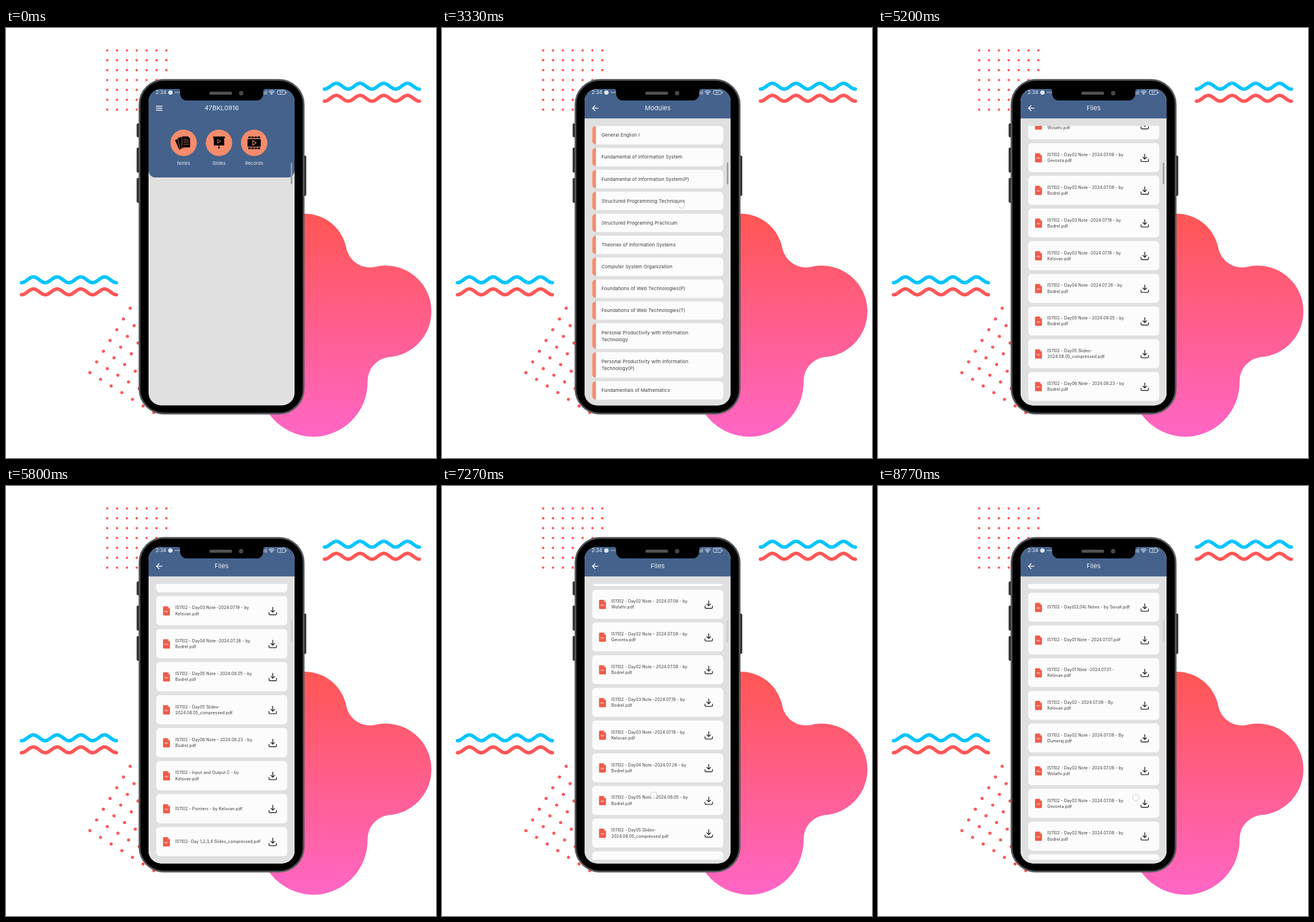
An HTML page that plays this animation: 748 px wide and 748 px high, repeating every 8810 ms.

```html
<!DOCTYPE html>
<html lang="en">
<head>
<meta charset="utf-8">
<title>Course notes app</title>
<style>
  html, body { margin: 0; width: 100%; height: 100%; overflow: hidden; background: #fff; }
  svg { display: block; width: 100vw; height: 100vh; }
  text { font-family: Inter, "Open Sans", sans-serif; }
  .title { font-size: 11px; letter-spacing: .05px; fill: #f3f5f8; text-anchor: middle; }
  .label { font-size: 7.9px; letter-spacing: .12px; fill: #eef1f5; text-anchor: middle; }
  .module { font-size: 8.2px; letter-spacing: .1px; fill: #3b3b3b; }
  .file { font-size: 7.2px; letter-spacing: .07px; fill: #3b3b3b; }
  .line { fill: none; stroke-linecap: round; stroke-linejoin: round; }
</style>
</head>
<body>
<svg viewBox="0 0 748 748" xmlns="http://www.w3.org/2000/svg">
  <defs>
    <linearGradient id="pink" gradientUnits="userSpaceOnUse" x1="0" y1="335" x2="0" y2="705">
      <stop offset="0" stop-color="#ff5757"/><stop offset="1" stop-color="#ff66c4"/>
    </linearGradient>
    <clipPath id="screen"><rect x="248" y="106" width="254" height="550.5" rx="22"/></clipPath>
    <clipPath id="pane"><rect x="248" y="170.3" width="254" height="480"/></clipPath>
    <g id="download" class="line" stroke="#242424" stroke-width="1.9" transform="scale(.72) translate(-12 -12)">
      <path d="M21 15.5v3.5a2 2 0 0 1-2 2H5a2 2 0 0 1-2-2v-3.5M7.5 10.5l4.5 4.5 4.5-4.5M12 15V3"/>
    </g>
    <g id="pdf">
      <path d="M-4.5-8H2.3L6-4.3V6.5A1.5 1.5 0 0 1 4.5 8H-4.5A1.5 1.5 0 0 1-6 6.5V-6.5A1.5 1.5 0 0 1-4.5-8Z" fill="#ee5b49"/>
      <path d="M2.3-8L6-4.3H3.3a1 1 0 0 1-1-1Z" fill="#f9b9ad"/>
      <text y="2.6" font-size="3.4" font-weight="700" fill="#fbd9d3" text-anchor="middle">PDF</text>
    </g>
  </defs>

  <rect width="748" height="748" fill="#fff"/>
  <path fill="url(#pink)" d="M519 323A74 74 0 0 1 592 383A42 42 0 0 0 642 415.5A79.5 79.5 0 0 1 740 493A79.5 79.5 0 0 1 665 572.5A42 42 0 0 0 629 614A95 95 0 0 1 534 711A95 95 0 0 1 440 617L445 397A74 74 0 0 1 519 323Z"/>
  <g id="dots" fill="#ff5757"></g>
  <g id="waves" class="line" stroke-width="6"></g>

  <g fill="#2c2f33">
    <rect x="227.3" y="166" width="8" height="24" rx="2"/>
    <rect x="227.3" y="208" width="8" height="43.5" rx="2"/>
    <rect x="227.3" y="261" width="8" height="43" rx="2"/>
    <rect x="514" y="222" width="8.3" height="70" rx="2"/>
  </g>
  <rect x="232.2" y="90.2" width="285.6" height="580.6" rx="43" fill="#000" stroke="#55585b" stroke-width="3"/>

  <g clip-path="url(#screen)">
    <g id="home">
      <rect x="248" y="106" width="254" height="551" fill="#e0e0e0"/>
      <path d="M248 106H502V248a12 12 0 0 1-12 12H260a12 12 0 0 1-12-12Z" fill="#44628b"/>
      <path d="M261.5 136H271.5M261.5 139.5H271.5M261.5 143H271.5" class="line" stroke="#f3f5f8" stroke-width="1.4"/>
      <text class="title" x="375.3" y="143.4">47BKL0916</text>
      <g fill="#f58c6c">
        <circle cx="309" cy="199.8" r="23"/><circle cx="370.5" cy="199.8" r="23"/><circle cx="431.7" cy="199.8" r="23"/>
      </g>
      <g stroke="#f58c6c" stroke-width=".7">
        <rect x="301" y="190" width="13" height="19" rx="1" transform="rotate(-24 309 210)"/>
        <rect x="302.5" y="189" width="13" height="20" rx="1" transform="rotate(-11 309 210)"/>
        <path d="M306 188.2H316.5L320.5 192V208H306Z"/>
        <path d="M308.5 193.5H316M308.5 196.5H318M308.5 199.5H318M308.5 202.5H318" fill="none"/>
      </g>
      <path d="M360.3 188.8h20.4v2.7h-1.2V204.3h-18V191.5h-1.2ZM369.9 204h1.2v3h-1.2Z"/>
      <circle cx="370.5" cy="208.3" r="1.4"/>
      <path d="M368.3 194.3v6l5-3Z" class="line" stroke="#f58c6c" stroke-width="1"/>
      <rect x="420.2" y="193.2" width="23" height="13.2" rx="1"/>
      <path d="M421.5 190.3H442M421.5 209.2H442" fill="none" stroke="#000" stroke-width="3" stroke-dasharray="4.3 1.1"/>
      <path d="M429.3 195.8v8l6-4Z" class="line" stroke="#f58c6c" stroke-width="1.1"/>
      <text class="label" x="309" y="237.7">Notes</text>
      <text class="label" x="370.5" y="237.7">Slides</text>
      <text class="label" x="431.7" y="237.7">Records</text>
    </g>
    <g id="modules"></g>
    <g id="files"></g>

    <g fill="#dfe6ef">
      <text x="260.3" y="115.2" font-size="8.4" font-weight="500">2:34</text>
      <circle cx="286" cy="112.2" r="3.8"/>
      <circle cx="295" cy="112.2" r=".9"/><circle cx="297.8" cy="112.2" r=".9"/><circle cx="300.6" cy="112.2" r=".9"/>
      <path d="M447.5 111.5h1.3v4.3h-1.3ZM450 110h1.3v5.8H450ZM452.5 108.3h1.3v7.5h-1.3Z" opacity=".75"/>
      <g class="line" stroke="#dfe6ef" stroke-width="1.2">
        <path d="M457.3 110.7a6.6 6.6 0 0 1 9.4 0M459 112.7a4.2 4.2 0 0 1 6 0M460.6 114.4a2 2 0 0 1 2.8 0"/>
        <rect x="472" y="108.6" width="14" height="7" rx="2.2" stroke-width="1"/>
        <path d="M487.7 111.3v1.6"/>
      </g>
      <circle cx="462" cy="115.5" r=".8"/>
      <text x="479" y="114" font-size="5" font-weight="600" text-anchor="middle">67</text>
    </g>
    <rect id="handle" x="495.4" y="234" width="2.7" height="38" rx="1.3" fill="#999ca1"/>
    <circle id="touch" r="5.8" fill="#fff" fill-opacity=".55" stroke="#b9b9b9" stroke-width=".8"/>
  </g>

  <path d="M299 104V106Q303 106 303 110V114.5A11.5 11.5 0 0 0 314.5 126H436A11.5 11.5 0 0 0 447.5 114.5V110Q447.5 106 451.5 106V104Z"/>
  <rect x="353.8" y="110.7" width="39.5" height="5.4" rx="2.7" fill="#525252"/>
  <circle cx="409" cy="113.4" r="3.8" fill="#474747"/>
</svg>

<script>
(() => {
  const LOOP = 8810;
  const el = id => document.getElementById(id);
  const clamp = v => Math.max(0, Math.min(1, v));
  const span = (t, a, b) => clamp((t - a) / (b - a));
  const easeOut = u => 1 - (1 - u) ** 3;

  // Background decoration
  function dotGrid(x, y, ax, ay, bx, by, r) {
    let out = '';
    for (let i = 0; i < 7; i++)
      for (let j = 0; j < 7; j++)
        out += `<circle cx="${x + i * ax + j * bx}" cy="${y + i * ay + j * by}" r="${r}"/>`;
    return out;
  }
  function wave(x, y, color) {
    const pts = [];
    for (let d = 0; d <= 165; d += 1.5)
      pts.push(`${x + d} ${(y - 5 + 5 * Math.cos(d / 165 * 8 * Math.PI)).toFixed(2)}`);
    return `<path d="M${pts.join('L')}" stroke="${color}"/>`;
  }
  el('dots').innerHTML =
    dotGrid(176, 39, 17.15, 0, 0, 17.17, 2.1) +
    dotGrid(216, 487.5, 18.5, 11.6, -11.67, 18.67, 2.7);
  el('waves').innerHTML = [[554, 106.3], [27, 443]].map(([x, y]) =>
    wave(x, y, '#00c4ff') + wave(x, y + 21, '#ff5757')).join('');

  // List pages; "|" separates the lines of an entry
  const moduleNames = [
    'General English I', 'Fundamental of Information System', 'Fundamental of Information System(P)',
    'Structured Programming Techniques', 'Structured Programing Practicum', 'Theories of Information Systems',
    'Computer System Organization', 'Foundations of Web Technologies(P)', 'Foundations of Web Technologies(T)',
    'Personal Productivity with Information|Technology', 'Personal Productivity with Information|Technology(P)',
    'Fundamentals of Mathematics'
  ];
  const fileNames = [
    ' - Arrays - by Kelovan.pdf', ' - Boolean - by Kelovan.pdf', ' - Day(02,04) Notes - by Sovali.pdf',
    ' - Day01 Note - 2024.07.01.pdf', ' - Day01 Note -2024.07.01 -|Kelovan.pdf',
    ' - Day02 - 2024.07.08 - By|Kelovan.pdf', ' - Day02 Note - 2024.07.08 - By|Dumeraj.pdf',
    ' - Day02 Note - 2024.07.08 - by|Wolathi.pdf', ' - Day02 Note - 2024.07.08 - by|Gevonta.pdf',
    ' - Day02 Note - 2024.07.08 - by|Bodrel.pdf', ' - Day03 Note -2024.07.19 - by|Bodrel.pdf',
    ' - Day03 Note -2024.07.19 - by|Kelovan.pdf', ' - Day04 Note -2024.07.26 - by|Bodrel.pdf',
    ' - Day05 Note - 2024.08.05 - by|Bodrel.pdf', ' - Day05 Slides-|2024.08.05_compressed.pdf',
    ' - Day06 Note - 2024.08.23 - by|Bodrel.pdf', ' - Input and Output C - by|Kelovan.pdf',
    ' - Pointers - by Kelovan.pdf', '- Day 1,2,3,4 Slides_compressed.pdf'
  ].map(s => 'IS1102' + s);

  const page = (title, body) =>
    `<rect x="248" y="106" width="254" height="551" fill="#e0e0e0"/>
    <rect x="248" y="106" width="254" height="51.3" fill="#44628b"/>
    <path d="M271.5 139.5H262M266.3 135L261.8 139.5L266.3 144" class="line" stroke="#f3f5f8" stroke-width="1.5"/>
    <text class="title" x="375.2" y="143.4">${title}</text>
    <g clip-path="url(#pane)">${body}</g>`;
  const card = (y, h) =>
    `<rect x="261.4" y="${y}" width="227.8" height="${h}" rx="6" fill="#fcfcfc"/>`;
  function lines(entry, cls, x, mid, gap) {
    const parts = entry.split('|');
    return parts.map((s, i) =>
      `<text class="${cls}" x="${x}" y="${mid + (i - (parts.length - 1) / 2) * gap}">${s}</text>`).join('');
  }

  let rowTop = 170.4;
  const moduleRows = moduleNames.map(entry => {
    const y = rowTop, h = entry.includes('|') ? 44.2 : 32;
    rowTop += h + 6.15;
    return card(y, h) +
      `<path d="M267.8 ${y}V${y + h}h-.4a6 6 0 0 1-6-6V${y + 6}a6 6 0 0 1 6-6Z" fill="#f58c6c"/>` +
      lines(entry, 'module', 277.4, y + h / 2 + 2.8, 12.2);
  }).join('');
  const fileRows = fileNames.map((entry, i) => {
    const mid = 195.7 + i * 56.87;
    return card(mid - 25.2, 50.4) +
      `<use href="#pdf" x="279.2" y="${mid + .3}"/><use href="#download" x="464" y="${mid + .5}"/>` +
      lines(entry, 'file', 294.5, mid + 2.6, 10.2);
  }).join('');
  el('modules').innerHTML = page('Modules', moduleRows);
  el('files').innerHTML = page('Files', `<g id="list">${fileRows}</g>`);

  // Swipes: start, release, rest times and the scroll offset at each
  const END = 600.5;
  const swipes = [
    [4670, 4800, 5530, 0, 130, 455],
    [5570, 5680, 5750, 455, 560, END],
    [6470, 6600, 7330, END, 510, 388],
    [7370, 7480, 8130, 388, 288, 98.6]
  ];
  function scrollAt(t) {
    let pos = 0;
    for (const [a, b, c, from, mid, to] of swipes)
      if (t >= a) pos = t < b ? from + (mid - from) * span(t, a, b)
                              : mid + (to - mid) * easeOut(span(t, b, c));
    return pos;
  }
  // List stretches briefly when a fling hits its end
  function stretchAt(t) {
    const u = span(t, 5740, 6400);
    return 1 + .142 * u * (1 - u) ** 4;
  }

  // Touches: begin, end, move start, from x y, to x y
  const touches = [
    [70, 330, 70, 448.5, 242.5, 448.5, 242.5],
    [3330, 3460, 3330, 416.3, 307.5, 416.3, 307.5],
    [4670, 4800, 4670, 436, 560, 440, 430],
    [5570, 5680, 5570, 438, 560, 442, 455],
    [6470, 6600, 6470, 380, 500, 374, 590],
    [7270, 7480, 7370, 368, 538, 364, 638],
    [8270, 8400, 8270, 443, 545.5, 443, 545.5],
    [8770, 8810, 8770, 448.5, 542, 448.5, 542]
  ];

  function enter(id, t, a, b) {
    const u = span(t, a, b), s = .92 + .08 * easeOut(u);
    const node = el(id);
    node.setAttribute('visibility', u > 0 ? 'visible' : 'hidden');
    node.setAttribute('opacity', clamp(u * 1.8));
    node.setAttribute('transform', `translate(375 381) scale(${s}) translate(-375 -381)`);
  }

  function draw(t) {
    enter('modules', t, 1400, 1770);
    enter('files', t, 3560, 3920);

    const k = stretchAt(t);
    el('list').setAttribute('transform', `matrix(1 0 0 ${k} 0 ${650 * (1 - k) - scrollAt(t) * k})`);
    el('handle').setAttribute('opacity', 1 - .72 * span(t, 5570, 5780));

    const hit = touches.find(([a, b]) => t >= a && t < b);
    const touch = el('touch');
    touch.setAttribute('visibility', hit ? 'visible' : 'hidden');
    if (hit) {
      const [, b, m, x0, y0, x1, y1] = hit;
      const u = span(t, m, b);
      touch.setAttribute('cx', x0 + (x1 - x0) * u);
      touch.setAttribute('cy', y0 + (y1 - y0) * u);
      touch.setAttribute('opacity', t < 1000 ? .5 : .9);
    }
  }

  const start = performance.now();
  function tick() {
    draw((performance.now() - start) % LOOP);
    requestAnimationFrame(tick);
  }
  tick();
})();
</script>
</body>
</html>
```
